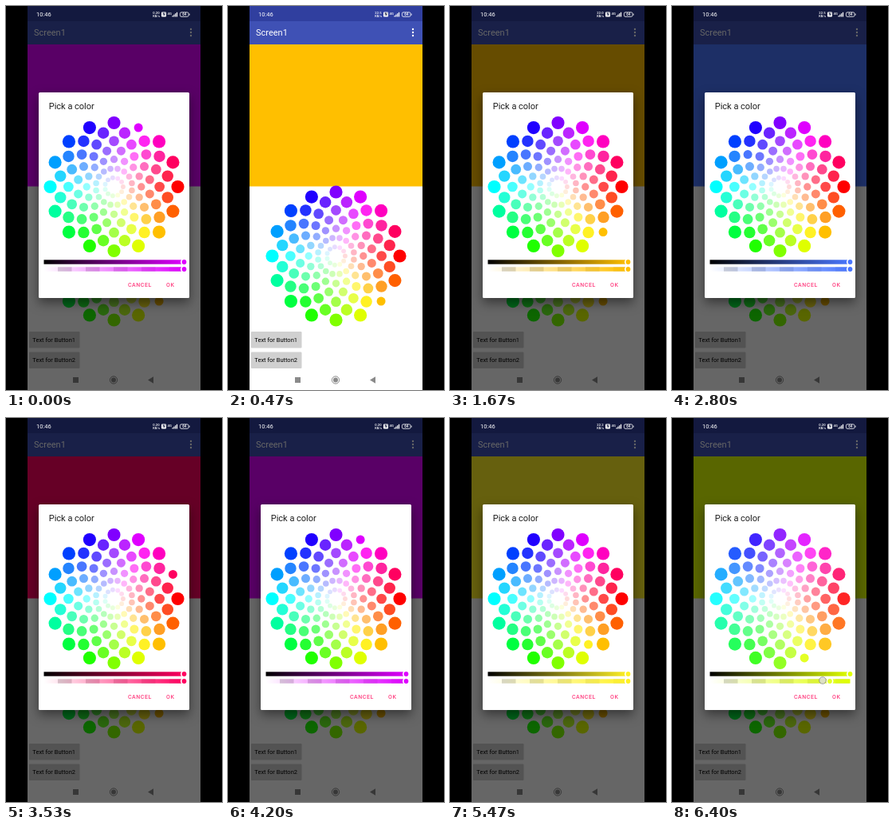
An HTML page with a canvas for the animation above (6470 ms loop, 271 by 480 pixels).

```html
<!DOCTYPE html>
<html lang="en">
<head>
<meta charset="utf-8">
<title>Color picker</title>
<style>
html, body { margin: 0; width: 100%; height: 100%; overflow: hidden; background: #000; }
canvas { display: block; width: 271px; height: 480px; }
</style>
</head>
<body>
<canvas id="stage"></canvas>
<script>
const W = 271, H = 480, LOOP = 6470;
const DENSITY = 8, RADIUS = 80;
const dpr = window.devicePixelRatio || 1;
const stage = document.getElementById('stage');
const layer = document.createElement('canvas');
const screen2d = setup(stage), dialog2d = setup(layer);

// Picked colors as [start time, ring, index on the ring].
const MAGENTA = [7, 13], AMBER = [7, 2];
const picks = [
  [0, ...MAGENTA], [70, ...AMBER], [2400, 5, 10], [3130, 7, 15],
  [3730, ...MAGENTA], [4800, 6, 2], [5930, 7, 3]
];
// Touch marks as [from, to, x, y].
const touches = [
  [800, 1000, 68, 417], [2400, 2530, 95, 186], [3130, 3260, 209, 195],
  [3730, 3860, 166, 152], [4800, 5470, 178.5, 290], [5930, 6000, 166, 299]
];
const speeds = [[0, '0.20'], [70, '22.5'], [1400, '22.0'], [2730, '22.5'],
  [3400, '0.20'], [4800, '22.2'], [5930, '0.20']];

function setup(canvas) {
  canvas.width = W * dpr;
  canvas.height = H * dpr;
  const c = canvas.getContext('2d');
  c.scale(dpr, dpr);
  return c;
}

const clamp = v => Math.max(0, Math.min(1, v));
const latest = (list, t) => list.filter(e => e[0] <= t).pop();

function rect(c, x, y, w, h, color) {
  c.fillStyle = color;
  c.fillRect(x, y, w, h);
}

function disc(c, x, y, r, color) {
  c.fillStyle = color;
  c.beginPath();
  c.arc(x, y, r, 0, Math.PI * 2);
  c.fill();
}

function box(c, x, y, w, h, r, color) {
  c.fillStyle = color;
  c.beginPath();
  c.roundRect(x, y, w, h, r);
  c.fill();
}

function text(c, str, x, y, size, color, weight = 400, spacing = 0) {
  c.font = `${weight} ${size}px Roboto, sans-serif`;
  c.letterSpacing = spacing + 'px';
  c.fillStyle = color;
  c.fillText(str, x, y);
}

// One dot of the flower wheel, relative to its center.
function dot(ring, index) {
  const cell = RADIUS / (DENSITY - 1) / 2;
  const r = RADIUS * ring / (DENSITY - 1);
  const size = ring ? cell * (1 + 1.2 * (ring / DENSITY - 0.5)) : cell;
  const fit = ring ? Math.floor(0.975 * Math.PI / Math.asin(size / r) + 0.5) : 1;
  const total = Math.min(fit, DENSITY * 2);
  const angle = Math.PI * (2 * index + (ring + 1) % 2) / total;
  return {
    x: r * Math.cos(angle), y: r * Math.sin(angle), size: size - 0.2, total,
    hue: angle * 180 / Math.PI, light: 100 - 50 * ring / (DENSITY - 1)
  };
}

const tint = (d, a = 1) => `hsla(${d.hue}, 100%, ${d.light}%, ${a})`;

function wheel(c, cx, cy, ring, index, alpha = 1) {
  for (let i = 0; i < DENSITY; i++) {
    const total = dot(i, 0).total;
    for (let j = 0; j < total; j++) {
      const d = dot(i, j), picked = i === ring && j === index;
      disc(c, cx + d.x, cy + d.y, picked ? 5.5 : d.size, tint(d, alpha));
    }
  }
}

function slider(c, y, from, color, pos) {
  const x0 = 47.5, x1 = 223.5, x = x0 + (x1 - x0) * pos;
  const g = c.createLinearGradient(x0, 0, x1, 0);
  g.addColorStop(0, from);
  g.addColorStop(1, color);
  rect(c, x0, y - 2.7, x1 - x0, 5.4, g);
  disc(c, x, y, 4.5, '#fff');
  return x;
}

function dialog(c, pick, alpha) {
  const d = dot(pick[1], pick[2]);
  c.clearRect(0, 0, W, H);
  c.save();
  c.shadowColor = 'rgba(0,0,0,.45)';
  c.shadowBlur = 14 * dpr;
  c.shadowOffsetY = 6 * dpr;
  box(c, 41, 108, 189, 257, 1.5, '#fff');
  c.restore();
  text(c, 'Pick a color', 53.7, 129, 11, '#1c1c1c');
  wheel(c, 135.5, 226, pick[1], pick[2], alpha);

  const lx = slider(c, 320, '#000', tint(d), 1);
  disc(c, lx, 320, 2.9, tint(d));
  for (let x = 65; x < 220; x += 35) rect(c, x, 326.3, 17.5, 5.4, '#d4d4d4');
  const ax = slider(c, 329, tint(d, 0), tint(d), alpha);
  disc(c, ax, 329, 2.9, tint(d, alpha));

  text(c, 'CANCEL', 153, 351, 7, '#ff4081', 500, 0.55);
  text(c, 'OK', 201, 351, 7, '#ff4081', 500, 0.55);
}

function button(c, y, h, label) {
  box(c, 29, y, 63.5, h, 1.2, '#d0d0d0');
  text(c, label, 33.3, y + 12.6, 7.5, '#000');
}

function app(c, pick) {
  rect(c, 27, 0, 217, H, '#fff');
  rect(c, 27, 0, 217, 19, '#303f9f');
  rect(c, 27, 19, 217, 29, '#3f51b5');
  text(c, 'Screen1', 35, 37, 11, '#fff');
  for (const y of [29, 33, 37]) disc(c, 232, y, 1.2, '#fff');
  rect(c, 27, 48, 217, 177.5, tint(dot(pick[1], pick[2])));
  wheel(c, 135.5, 312.5, ...AMBER);
  button(c, 407, 20.5, 'Text for Button1');
  button(c, 432.5, 20.5, 'Text for Button2');

  rect(c, 84, 464, 7, 7, '#8a8a8a');
  c.strokeStyle = '#8a8a8a';
  c.lineWidth = 1;
  c.beginPath();
  c.arc(135, 467.5, 4.6, 0, Math.PI * 2);
  c.stroke();
  disc(c, 135, 467.5, 3, '#8a8a8a');
  c.beginPath();
  c.moveTo(178, 467.5);
  c.lineTo(185, 463.3);
  c.lineTo(185, 471.7);
  c.fill();
}

function status(c, t) {
  text(c, '10:46', 38, 13, 7.5, '#fff');
  text(c, latest(speeds, t)[1], 184.3, 10, 4.2, '#fff', 500);
  text(c, 'KB/s', 184.3, 13.6, 4, '#fff', 500);
  box(c, 195, 7.5, 6, 6, 1, '#fff');
  text(c, 'N', 196.4, 12.3, 4.6, '#1a2145', 700);
  text(c, '4G', 202.5, 10.6, 4.2, '#fff', 500);
  for (let i = 0; i < 4; i++) rect(c, 208.5 + i * 1.8, 12 - i * 1.4, 1.2, 1.5 + i * 1.4, '#fff');
  c.strokeStyle = '#fff';
  c.lineWidth = 0.8;
  c.beginPath();
  c.roundRect(218.4, 7.9, 10.6, 5.4, 1.6);
  c.stroke();
  rect(c, 229.6, 9.6, 0.9, 2, '#fff');
  text(c, '64', 221.2, 12.3, 4.6, '#fff', 500);
}

function touch(c, x, y) {
  disc(c, x, y, 4.3, 'rgba(220,220,220,.85)');
  c.strokeStyle = 'rgba(110,110,110,.75)';
  c.lineWidth = 0.8;
  c.stroke();
}

function draw(t) {
  const c = screen2d, pick = latest(picks, t);
  const shown = t < 70 ? 1 : clamp((t - 862) / 200);
  const drag = clamp((t - 6200) / 200);
  rect(c, 0, 0, W, H, '#000');
  app(c, pick);
  rect(c, 27, 0, 217, H, `rgba(0,0,0,${0.6 * shown})`);
  status(c, t);
  if (shown) {
    dialog(dialog2d, pick, 1 - 0.145 * drag);
    c.globalAlpha = shown;
    c.drawImage(layer, 0, 0, W, H);
    c.globalAlpha = 1;
  }
  for (const [from, to, x, y] of touches) if (t >= from && t < to) touch(c, x, y);
  if (t >= 6270) touch(c, 215 - 26 * drag, 328);
}

function tick(now) {
  draw(now % LOOP);
  requestAnimationFrame(tick);
}
draw(0);
requestAnimationFrame(tick);
</script>
</body>
</html>
```
